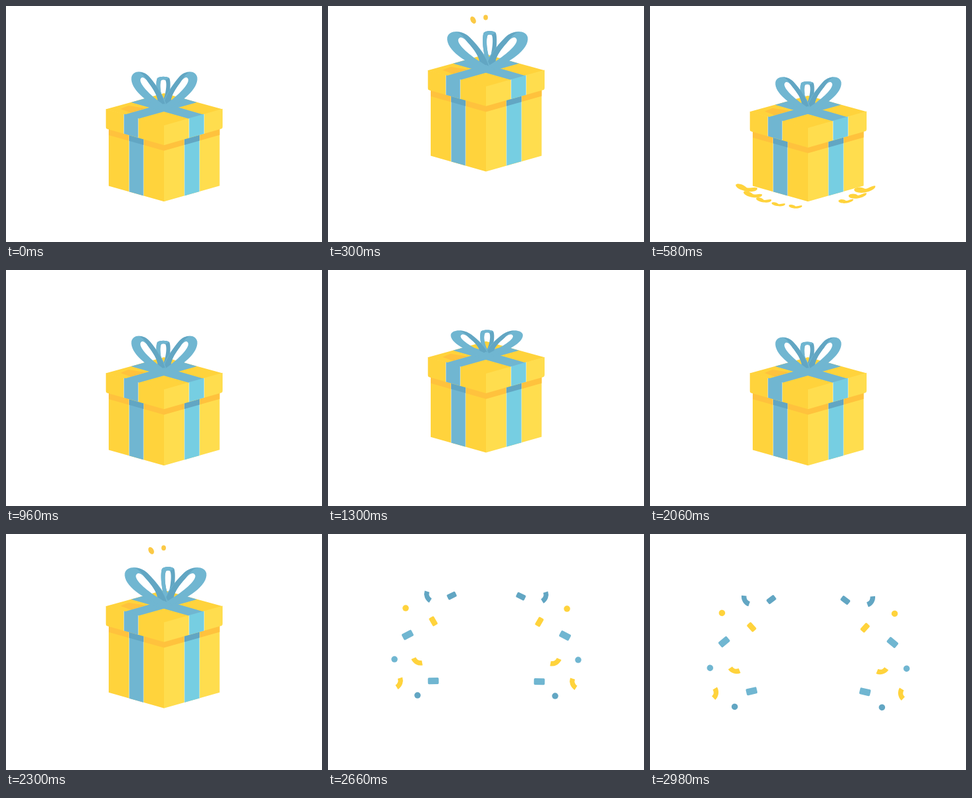
These frames come from a looping animation (480x360 px, 3000 ms). An HTML page with a canvas:

```html
<!DOCTYPE html>
<html lang="en">
<head>
<meta charset="utf-8">
<title>Gift box</title>
<style>
html, body { margin: 0; width: 100%; height: 100%; overflow: hidden; background: #fff; }
canvas { display: block; width: 480px; height: 360px; }
</style>
</head>
<body>
<canvas id="stage" width="480" height="360"></canvas>
<script>
const ctx = document.getElementById("stage").getContext("2d");
const LOOP = 3000, POP = 2440, AIR = 330, CROUCH = 200;
const TAKEOFFS = [230, 1275, 2255];
const YELLOW = "#ffd33c", LIGHT = "#ffdd4e", ORANGE = "#ffc23d", GOLD = "#fbc945";
const BLUE = "#70b6d1", CYAN = "#76cee2", DARK = "#62a6c3", SEAM = "rgba(255,255,255,.4)";
const MID = 240.5;

// Left half of the burst: shape, colour, x, y, angle
const CONFETTI = [
  ["bent", DARK, 152, 95, 70],
  ["slim", DARK, 188, 94, -26],
  ["dot", YELLOW, 118, 113, 0],
  ["slim", YELLOW, 160, 133, 60],
  ["rect", BLUE, 121, 154, -28],
  ["dot", BLUE, 101, 191, 0],
  ["bent", YELLOW, 136, 194, 28],
  ["bent", YELLOW, 108, 227, -70],
  ["rect", BLUE, 160, 224, -1],
  ["dot", DARK, 136, 246, 0]
];

const mix = (a, b, p) => a + (b - a) * p;
const clamp = p => Math.max(0, Math.min(1, p));
const smooth = p => p * p * (3 - 2 * p);

function poly(color, ...pts) {
  ctx.fillStyle = color;
  ctx.beginPath();
  for (let i = 0; i < pts.length; i += 2) ctx.lineTo(pts[i], pts[i + 1]);
  ctx.fill();
}

function shape(color, d) {
  ctx.fillStyle = color;
  ctx.fill(new Path2D(d), "evenodd");
}

function oval(color, x, y, rx, ry, turn = 0) {
  ctx.fillStyle = color;
  ctx.beginPath();
  ctx.ellipse(x, y, rx, ry, turn, 0, Math.PI * 2);
  ctx.fill();
}

// Box pose: a damped wobble on the ground, a crouch, then a springy leap.
function pose(t) {
  const next = TAKEOFFS.find(s => t < s + AIR);
  const age = t - next;
  if (age >= 0) {
    const u = age / AIR, kick = clamp((age - 10) / 35);
    return {
      lift: 272 * u * (1 - u),
      stretch: mix(-5, 17 * (1 - u), kick),
      height: mix(34, 57, kick * kick),
      spread: 1.05 + 0.22 * kick * kick * (1 - u)
    };
  }
  const c = smooth(clamp(age / CROUCH + 1));
  const before = TAKEOFFS[TAKEOFFS.indexOf(next) - 1] ?? -1e4;
  const g = t - before - AIR;
  const wobble = 6 * Math.exp(-g / 40) - 26 * Math.exp(-g / 200) * Math.sin(Math.PI * g / 200);
  return {
    lift: 0,
    stretch: -5.5 * Math.exp(-g / 55) - 5 * c,
    height: 55 + wobble - 21 * c,
    spread: 1 + 0.05 * c
  };
}

// One slanted strip of a side face; half is the half width of the box part.
function wall(color, x0, x1, top, bottom, half) {
  const fall = x => (half - Math.abs(x - 240)) * 0.284;
  poly(color, x0, top + fall(x0), x1, top + fall(x1), x1, bottom + fall(x1), x0, bottom + fall(x0));
}

function ribbon(color, x0, x1, top, bottom, half) {
  wall(color, x0, x1, top, bottom, half);
  for (const x of [x0, x1]) wall(SEAM, x - 0.6, x + 0.6, top, bottom, half);
}

function body(lift, rise) {
  const top = 180 - rise, shade = 197 - rise, foot = 274.5 - lift;
  wall(YELLOW, 156, 240, top, foot, 84);
  wall(LIGHT, 240, 324.5, top, foot, 84);
  wall(ORANGE, 156, 240, top, shade, 84);
  wall(ORANGE, 240, 324.5, top, shade, 84);
  ribbon(BLUE, 187, 209, top, foot, 84);
  ribbon(CYAN, 271, 294, top, foot, 84);
  wall(DARK, 187, 209, top, shade, 84);
  wall(DARK, 271, 294, top, shade, 84);
}

function lid() {
  ctx.save();
  ctx.beginPath();
  ctx.roundRect(151.5, 100, 177.5, 89, 5);
  ctx.rect(157, 100, 166, 120);
  ctx.clip();
  poly(YELLOW, 151.5, 157.5, 240, 133, 329, 157.5, 240, 183);
  wall(YELLOW, 151.5, 240, 157, 187, 88.5);
  wall(LIGHT, 240, 329, 157, 187, 88.5);
  poly(ORANGE, 174, 157, 186, 152, 212, 156, 190, 163);
  poly(BLUE, 179, 166, 201, 172, 290, 147, 268, 140.5);
  poly(BLUE, 190, 147, 213, 140.5, 301, 166, 278, 172);
  ribbon(BLUE, 179, 201, 157, 187, 88.5);
  ribbon(CYAN, 278, 301, 157, 187, 88.5);
  ctx.restore();
}

function loop(side) {
  ctx.save();
  ctx.scale(side, 1);
  shape(BLUE, "M-4 2C-26 -8 -52 -28 -50 -46C-48 -57 -32 -58 -22 -46C-11 -33 1 -16 4 0Z" +
    "M-10 -11C-24 -22 -39 -37 -36 -44C-33 -49 -28 -44 -24 -38C-17 -29 -11 -19 -10 -11Z");
  shape(DARK, "M2 -2C-1 -16 -11 -33 -22 -46C-27 -52 -33 -54 -38 -54C-33 -52 -29 -46 -24 -38C-17 -29 -11 -19 -10 -11Z");
  ctx.restore();
}

function bow(y, height, spread) {
  const open = spread - 1;
  ctx.save();
  ctx.translate(MID + open * 8, y);
  ctx.scale(1, height / 55);
  ctx.save();
  ctx.translate(open * 22 - 1.5, 0);
  ctx.scale(1, Math.min(1.18, 1 + 2 * open));
  shape(DARK, "M-3 -3C-11 -20 -12 -40 -9 -45C-5 -48 5 -48 9 -45C12 -40 11 -20 4 -3Z" +
    "M0 -12C-5 -22 -6 -38 -3 -42C-1 -43 1 -43 3 -42C6 -38 4 -22 0 -12Z");
  shape(BLUE, "M-9 -45C-5 -48 5 -48 9 -45L3 -42C1 -43 -1 -43 -3 -42C-6 -38 -5 -22 0 -12L-3 -3C-11 -20 -12 -40 -9 -45Z");
  ctx.restore();
  ctx.scale(spread, 1);
  loop(-1);
  loop(1);
  ctx.restore();
  poly(BLUE, 228, y, 240, y - 6, 253, y, 240, y + 6);
}

// Chips pushed out along an ellipse round the foot of the box.
function crumbs(age) {
  if (age < 0 || age > 145) return;
  const p = (age - 20) / 75;
  const fade = Math.min(1, 0.6 + age / 50, (145 - age) / 35);
  for (let i = 0; i < 8; i++) {
    const a = (i < 5 ? 168 - 17 * i : 134 - 17 * i) * Math.PI / 180;
    const side = Math.cos(a);
    const shrink = 1 - 0.75 * clamp(p) * Math.min(1, 4 * Math.abs(Math.cos(a - 0.175)));
    const size = shrink * fade / 2;
    const x = 237 + side * mix(92, 120, p), y = 270 + Math.sin(a) * mix(36, 53, p);
    ctx.save();
    ctx.translate(x, y);
    ctx.scale((20 + 14 * side ** 4) * size, (6 + 5 * side ** 4) * size);
    ctx.transform(1, -0.5 * side, 0, 1, 0, 0);
    shape(YELLOW, "M-1 -.5C-.8 -1.2 -.2 -.8 0 -.1C.3 .1 .7 -.8 1 -.5C1.1 .4 .5 1 0 1C-.5 1 -1.1 .4 -1 -.5Z");
    ctx.restore();
  }
}

function sparks(age) {
  if (age <= 40 || age > 340) return;
  const up = 17 * Math.sin(Math.PI * (age - 45) / 340);
  oval(GOLD, 220.5, 25.5 - up, 3.8, 5.8, -0.5);
  oval(GOLD, 239.5, 21.5 - up, 3.4, 4);
}

function piece(kind, color, x, y, angle, size) {
  ctx.save();
  ctx.translate(x, y);
  ctx.rotate(angle * Math.PI / 180);
  ctx.scale(size, size);
  ctx.beginPath();
  if (kind === "bent") {
    ctx.strokeStyle = color;
    ctx.lineWidth = 7.5;
    ctx.arc(0, -10.5, 12, 0.9, Math.PI - 0.9);
    ctx.stroke();
  } else if (kind === "dot") {
    oval(color, 0, 0, 4.8, 4.8);
  } else {
    const w = kind === "rect" ? 16.5 : 14, h = w * 0.61;
    ctx.fillStyle = color;
    ctx.roundRect(-w / 2, -h / 2, w, h, 1.8);
    ctx.fill();
  }
  ctx.restore();
}

// Fast burst from the middle, then a slow drift outwards and down.
function confetti(t) {
  const out = 1 - (1 - clamp((t - POP) / 220)) ** 3;
  const drift = Math.max(0, (t - POP - 220) / 320);
  for (const side of [1, -1]) {
    ctx.save();
    ctx.translate(MID, 150);
    ctx.scale(side, 1);
    for (const [kind, color, x, y, angle] of CONFETTI) {
      const dx = (x - MID) * (1 + 0.07 * drift);
      const dy = y - 150 + (6 + (y - 94) * 0.075) * drift + (side < 0 ? 1 : 0);
      piece(kind, color, dx * out, dy * out, angle - 12 * drift + 60 * (1 - out), mix(0.4, 1, out));
    }
    ctx.restore();
  }
}

function draw(t) {
  ctx.fillStyle = "#fff";
  ctx.fillRect(0, 0, 480, 360);
  if (t >= POP) return confetti(t);
  const { lift, stretch, height, spread } = pose(t);
  const rise = lift + stretch;
  for (const s of TAKEOFFS) crumbs(t - s - AIR);
  body(lift, rise);
  ctx.save();
  ctx.translate(0, -rise);
  lid();
  ctx.restore();
  bow(155 - rise, height, spread);
  for (const s of TAKEOFFS) sparks(t - s);
}

const begin = performance.now();
function tick() {
  draw((performance.now() - begin) % LOOP);
  requestAnimationFrame(tick);
}
tick();
</script>
</body>
</html>
```
